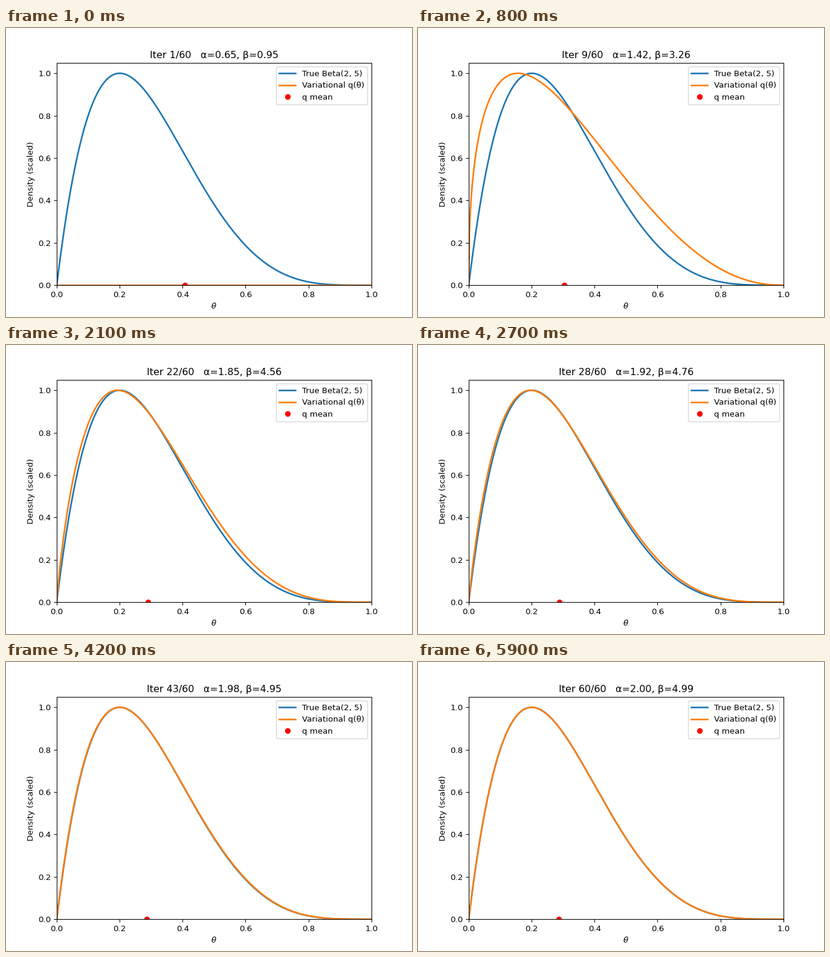
A matplotlib script that plays this animation: 672x480 px, repeating every 6000 ms.

```python
import numpy as np
import matplotlib.pyplot as plt
from matplotlib.animation import FuncAnimation

STEPS = 60
RATE = 0.1
TRUE_A, TRUE_B = 2.0, 5.0
START_A, START_B = 0.5, 0.5

theta = np.linspace(0, 1, 400)


def scaled_beta(a, b):
    """Beta density divided by its peak; flat when an end is unbounded."""
    with np.errstate(divide="ignore", invalid="ignore"):
        density = theta ** (a - 1) * (1 - theta) ** (b - 1)
        return density / density.max()


def approach(start, goal, step):
    return goal + (start - goal) * (1 - RATE) ** step


plt.rcParams["font.family"] = "DejaVu Sans"
fig, ax = plt.subplots(figsize=(7, 5), dpi=96)
ax.plot(theta, scaled_beta(TRUE_A, TRUE_B), lw=2, label="True Beta(2, 5)")
q_line, = ax.plot([], [], lw=2, label="Variational q(θ)")
mean_dot, = ax.plot([], [], "ro", label="q mean")
ax.set_xlim(0, 1)
ax.set_ylim(0, 1.05)
ax.set_xlabel(r"$\theta$")
ax.set_ylabel("Density (scaled)")
ax.legend(loc="upper right")
title = ax.set_title("")


def update(frame):
    step = frame + 1
    a = approach(START_A, TRUE_A, step)
    b = approach(START_B, TRUE_B, step)
    q_line.set_data(theta, scaled_beta(a, b))
    mean_dot.set_data([a / (a + b)], [0])
    title.set_text(f"Iter {step}/{STEPS}   α={a:.2f}, β={b:.2f}")
    return q_line, mean_dot, title


anim = FuncAnimation(fig, update, frames=STEPS, interval=100, repeat=True)
plt.show()
```
